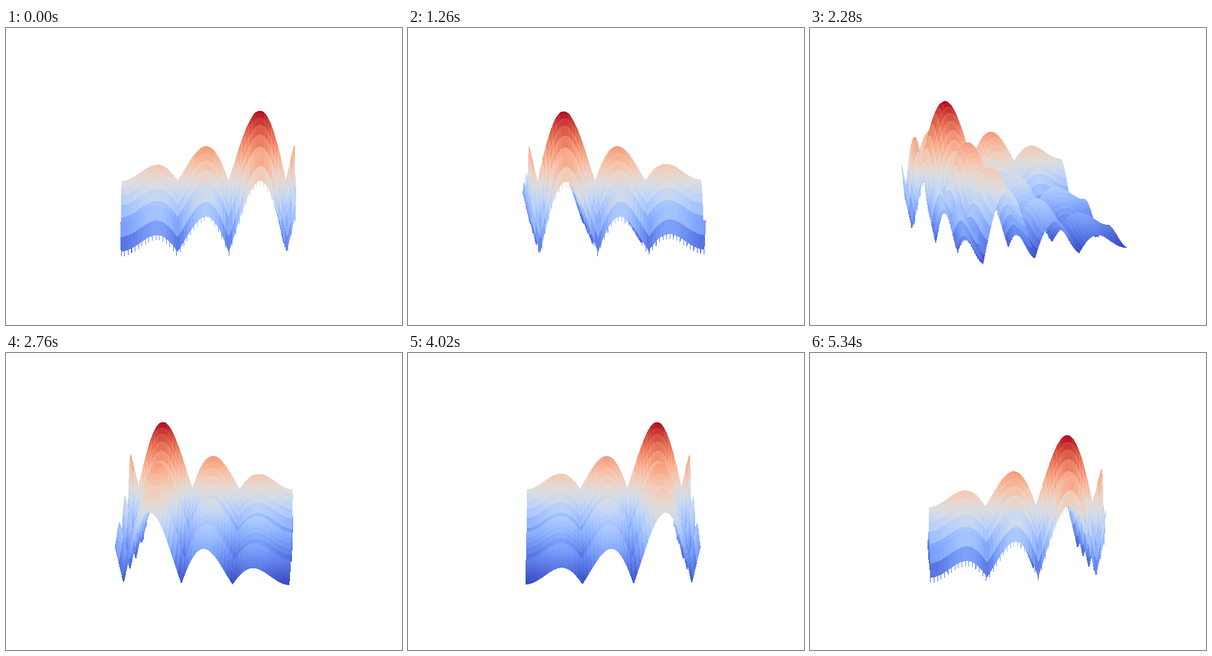
A matplotlib script for the animation above (5.4 s loop, 640 by 480 pixels).

```python
import matplotlib.pyplot as plt
import numpy as np
from matplotlib.animation import FuncAnimation

FRAMES = 90
INTERVAL = 60  # ms
ELEVATION = 10


def ridge(t):
    return np.abs(t * np.sin(t) + 0.1 * t)


fig = plt.figure(figsize=(6.4, 4.8), dpi=100, facecolor="white")
ax = fig.add_axes([0, 0, 1, 1], projection="3d")
ax.set_axis_off()

# Fine samples along each patch edge, 50 patches per side.
t = np.linspace(0, 10, 501)
x, y = np.meshgrid(t, t)
ax.plot_surface(x, y, ridge(x) + ridge(y), rstride=10, cstride=10,
                cmap="coolwarm", linewidth=0, antialiased=False)
ax.margins(0.05, 0.05, 0)


def turn(i):
    ax.view_init(elev=ELEVATION, azim=i * 360 / FRAMES)
    return []


def start():
    return turn(0)


anim = FuncAnimation(fig, turn, frames=FRAMES, init_func=start,
                     interval=INTERVAL, blit=False, repeat=True)
plt.show()
```
